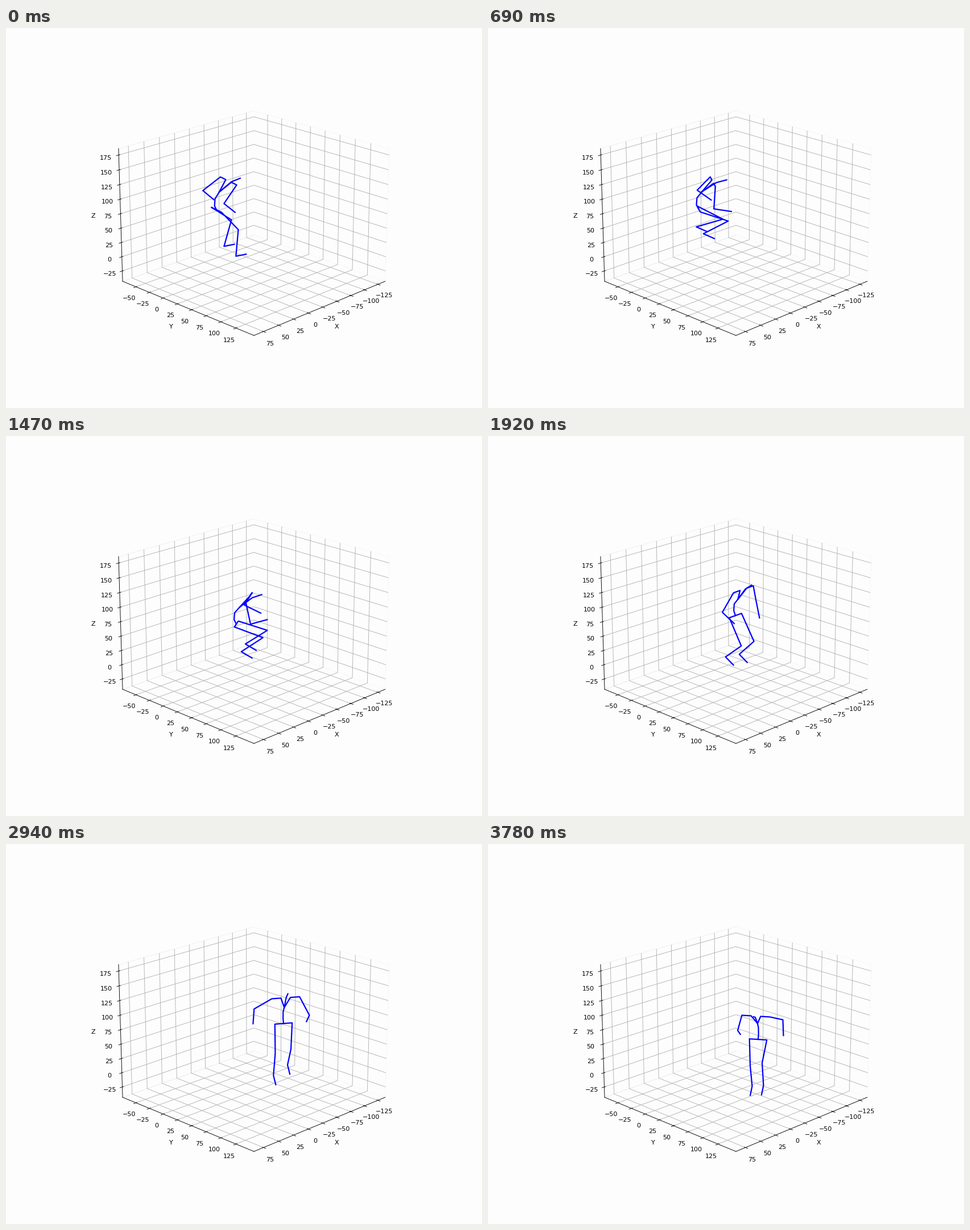
A matplotlib script for the animation above (3810 ms loop, 837 by 669 pixels).

```python
import numpy as np
import matplotlib.pyplot as plt
from matplotlib.animation import FuncAnimation
from matplotlib.lines import Line2D
from matplotlib.transforms import IdentityTransform

W, H, DPI = 837, 669, 80
FRAMES, STEP = 127, 30
PAPER = "#fdfdfd"
ELEV, AZIM = 20, 45

# bone lengths in pixels
THIGH, SHIN, FOOT = 54, 49, 22
UPPER_ARM, FOREARM = 40, 32
HEAD, COLLAR = 48, 26
HIP_HALF, COLLAR_HALF, SHOULDER_HALF = 15.5, 8.5, 25
SPINE = [(0, 0), (-4, 8), (-3, 21), (6, 32)]  # (forward, up) from the pelvis
FAR_LIFT = 26                                 # sideways lift of the far arm

# key times, then one curve per degree of freedom (pixels or degrees)
TIMES = np.array([0, 390, 960, 1470, 2370, 2940, 3780], float)
CURVES = dict(
    x=[370, 366, 379, 405, 464, 488, 475],
    y=[320, 311, 331, 331, 304, 316, 344],
    heading=[-35, -9, -13, 13, 70, 78, 100],
    nod=[70, 62, 70, 56, 36, 40, 56],
    far_thigh=[53, 53, 66, 76, -11, -11, 61],
    far_shin=[-19, -61, -79, -54, -45, -36, -16],
    near_thigh=[42, 50, 81, 73, -4, 3, -8],
    near_shin=[-6, -61, -57, -53, -45, -18, -24],
    far_arm=[-45, -52, -18, -30, 0, 0, -64],
    far_fore=[47, 82, 23, 67, -49, -50, -10],
    near_arm=[-43, -16, 0, 15, -48, -36, -25],
    near_fore=[48, 120, 36, 110, -5, -16, -58],
    near_lift=[0, 10, 10, 10, 45, 45, 15],
)
values = np.array(list(CURVES.values()), float)
slopes = np.gradient(values, TIMES, axis=1)


def curves_at(t):
    """Cubic Hermite value of every curve at time t."""
    i = min(np.searchsorted(TIMES, t, side="right") - 1, len(TIMES) - 2)
    span = TIMES[i + 1] - TIMES[i]
    u = (t - TIMES[i]) / span
    ease = u * u * (3 - 2 * u)
    v = (values[:, i] * (1 - ease) + values[:, i + 1] * ease
         + span * u * (1 - u) ** 2 * slopes[:, i]
         - span * u * u * (1 - u) * slopes[:, i + 1])
    return dict(zip(CURVES, v))


def hop(t, when, height):
    return height * np.exp(-((t - when) / 90) ** 2)


def skeleton(t):
    """Five joint chains in screen pixels, y downwards."""
    c = curves_at(t)
    rad = np.radians
    sin_e, cos_e = np.sin(rad(ELEV)), np.cos(rad(ELEV))
    sin_h, cos_h = np.sin(rad(c["heading"])), np.cos(rad(c["heading"]))
    forward = np.array([cos_h, sin_h * sin_e])
    right = np.array([-sin_h, cos_h * sin_e])
    down = np.array([0, cos_e])

    def bone(length, swing, lift=0, side=1):
        a, b = rad(swing), rad(lift)
        return length * (np.cos(b) * (np.sin(a) * forward + np.cos(a) * down)
                         + side * np.sin(b) * right)

    def limb(*steps):
        return np.cumsum(steps, axis=0)

    root = np.array([c["x"], c["y"] - hop(t, 570, 12) - hop(t, 2680, 9)])
    spine = [root + f * forward - u * down for f, u in SPINE]
    chest = spine[-1]
    head = bone(HEAD, 180 - c["nod"])
    neck = bone(0.62 * HEAD, 184 - 0.95 * c["nod"])
    chains = [np.array(spine + [chest + neck, chest + head])]

    foot_angle = 62 + 26 * np.exp(-t / 150)
    collar = bone(COLLAR, 180 - 0.72 * c["nod"])
    for name, side, lift in (("far", -1, FAR_LIFT), ("near", 1, c["near_lift"])):
        chains.append(limb(
            chest,
            collar + side * COLLAR_HALF * right,
            side * (SHOULDER_HALF - COLLAR_HALF) * right,
            bone(UPPER_ARM, c[name + "_arm"], lift, side),
            bone(FOREARM, c[name + "_fore"])))
        chains.append(limb(
            root,
            side * HIP_HALF * right,
            bone(THIGH, c[name + "_thigh"]),
            bone(SHIN, c[name + "_shin"]),
            bone(FOOT, foot_angle)))
    return chains


# the tiny surplus keeps the pixel size from being truncated
fig = plt.figure(figsize=((W + 1e-6) / DPI, (H + 1e-6) / DPI), dpi=DPI,
                 facecolor=PAPER)
ax = fig.add_subplot(projection="3d", facecolor=PAPER)
ax.view_init(elev=ELEV, azim=AZIM)

HALF = 110 * 25 / 24
ax.set_xlim(-24.2 - HALF, -24.2 + HALF)
ax.set_ylim(39.6 - HALF, 39.6 + HALF)
ax.set_zlim(71.2 - HALF, 71.2 + HALF)
ax.set_xticks(range(-125, 76, 25))
ax.set_yticks(range(-50, 126, 25))
ax.set_zticks(range(-25, 176, 25))
ax.set(xlabel="X", ylabel="Y", zlabel="Z")
for axis in (ax.xaxis, ax.yaxis, ax.zaxis):
    axis.pane.set_fill(False)

lines = [
    fig.add_artist(Line2D([], [], color="blue", lw=2, zorder=5,
                          solid_joinstyle="round",
                          transform=IdentityTransform()))
    for _ in range(5)
]


def update(n):
    for line, joints in zip(lines, skeleton(n * STEP)):
        line.set_data(joints[:, 0], H - joints[:, 1])
    return lines


anim = FuncAnimation(fig, update, frames=FRAMES, interval=STEP,
                     repeat=True, repeat_delay=0, blit=False)
plt.show()
```
